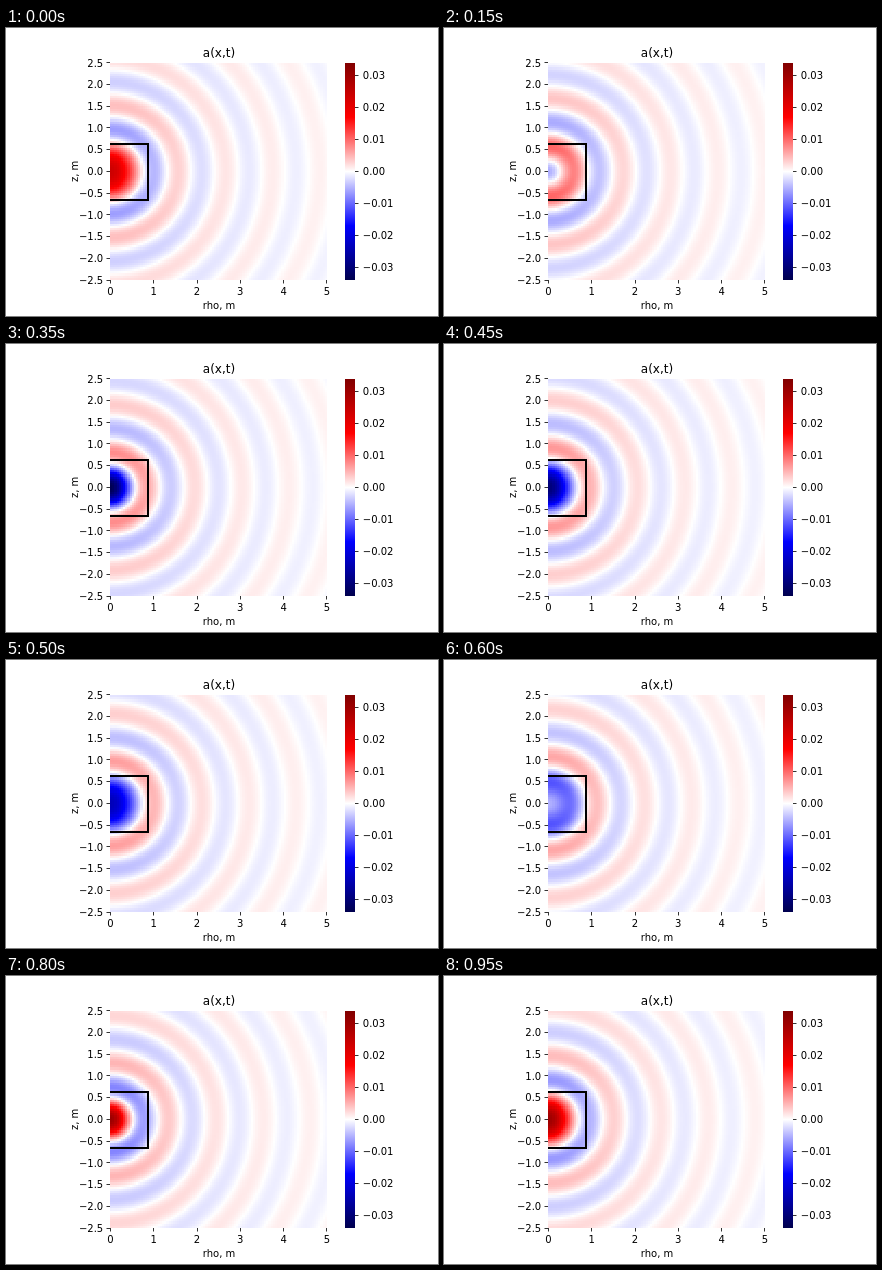
Animation of 432x288 px, one loop 1000 ms. Source, as an HTML page with a canvas:

```html
<!DOCTYPE html>
<html lang="en">
<head>
<meta charset="utf-8">
<title>a(x,t)</title>
<style>
html, body { margin: 0; width: 100%; height: 100%; overflow: hidden; background: #fff; }
canvas, svg { position: absolute; left: 0; top: 0; }
canvas { left: 104px; top: 35px; width: 217px; height: 217px; image-rendering: pixelated; }
text { font: 10px "DejaVu Sans", sans-serif; fill: #000; }
.title { font-size: 12px; }
.tick { stroke: #000; stroke-width: .8; }
</style>
</head>
<body>
<canvas id="field" width="100" height="100"></canvas>
<svg id="plot" width="432" height="288" viewBox="0 0 432 288">
  <defs>
    <linearGradient id="seismic" x1="0" y1="0" x2="0" y2="1">
      <stop offset="0" stop-color="#800000"/>
      <stop offset=".25" stop-color="#f00"/>
      <stop offset=".5" stop-color="#fff"/>
      <stop offset=".75" stop-color="#00f"/>
      <stop offset="1" stop-color="#00004d"/>
    </linearGradient>
  </defs>
  <rect x="339" y="35" width="10" height="217" fill="url(#seismic)"/>
  <path d="M104 116H142V172H104" fill="none" stroke="#000" stroke-width="2"/>
</svg>
<script>
const N = 100, PERIOD = 1000, STEP = 50;
const K = 2 * Math.PI / 1.08;   // wave number, 1/m
const B = 3.5;                  // source radius times K
const PHASE = 207 * Math.PI / 180;

// Axes
const plot = document.getElementById("plot");

function add(name, attrs, content) {
  const el = document.createElementNS("http://www.w3.org/2000/svg", name);
  for (const key in attrs) el.setAttribute(key, attrs[key]);
  if (content) el.textContent = content;
  plot.appendChild(el);
}
const label = (x, y, anchor, content, extra) =>
  add("text", { x, y, "text-anchor": anchor, ...extra }, content);
const tick = (x1, y1, x2, y2) => add("line", { x1, y1, x2, y2, class: "tick" });
const snap = v => Math.floor(v) + .5;
const num = (v, digits) => (v < 0 ? "\u2212" : "") + Math.abs(v).toFixed(digits);

for (let i = 0; i <= 5; i++) {
  const x = 104.4 + i * 43.3;
  tick(snap(x), 252, snap(x), 255.5);
  label(x, 267, "middle", String(i));
}
for (let i = -5; i <= 5; i++) {
  const y = 143.4 - i * 21.72;
  tick(100.5, snap(y), 104, snap(y));
  label(97.2, y + 3.8, "end", num(i / 2, 1));
}
for (let i = -3; i <= 3; i++) {
  const y = 143.4 - i * 32;
  tick(349, snap(y), 352.5, snap(y));
  label(356.8, y + 3.8, "start", num(i / 100, 2));
}
label(213, 28.6, "middle", "a(x,t)", { class: "title" });
label(213, 280.5, "middle", "rho, m");
label(0, 0, "middle", "z, m", { transform: "translate(71.5 143.4) rotate(-90)" });

// Complex amplitude of a wave radiated by a parabolic source
const eRe = -1.5 + .5 - 1 + 6 / (B * B), eIm = -6 / B;
const cRe = Math.cos(B) * eRe - Math.sin(B) * eIm;
const cIm = Math.sin(B) * eRe + Math.cos(B) * eIm;
const peak = Math.hypot(cRe - 1 - 6 / (B * B), cIm);

function amplitude(rho, z) {
  const r2 = rho * rho + z * z;
  const r = Math.sqrt(r2) - .06 * rho * rho / (r2 + .3);
  const gain = (1 + .2 * (z * z - rho * rho) / (r2 + .3)) / peak;
  const x = Math.max(K * r, 1e-4);
  if (x > B) return [gain * cIm * Math.cos(x) / x, gain * cIm * Math.sin(x) / x];
  const s = Math.sin(x) / x;
  return [gain * (cRe * s - 1 + (x * x - 6) / (B * B)), gain * cIm * s];
}

const waves = [];
for (let j = 0; j < N; j++)
  for (let i = 0; i < N; i++)
    waves.push(amplitude((i + .5) * 5 / N, 2.5 - (j + .5) * 5 / N));

const ctx = document.getElementById("field").getContext("2d");
const image = ctx.createImageData(N, N);

function paint(v, p) {
  const m = Math.min(1, Math.abs(v));
  const pale = 255 * Math.max(0, 1 - 2 * m);
  const deep = 255 - Math.max(0, 2 * m - 1) * (v > 0 ? 127 : 178);
  image.data[p] = v > 0 ? deep : pale;
  image.data[p + 1] = pale;
  image.data[p + 2] = v > 0 ? pale : deep;
  image.data[p + 3] = 255;
}

let shown = -1;
function draw(now) {
  const step = Math.floor(now % PERIOD / STEP);
  if (step !== shown) {
    shown = step;
    const angle = PHASE - 2 * Math.PI * step * STEP / PERIOD;
    const c = Math.cos(angle), s = Math.sin(angle);
    waves.forEach(([re, im], i) => paint(re * c - im * s, i * 4));
    ctx.putImageData(image, 0, 0);
  }
}

const start = performance.now();
function loop() {
  draw(performance.now() - start);
  requestAnimationFrame(loop);
}
loop();
</script>
</body>
</html>
```
